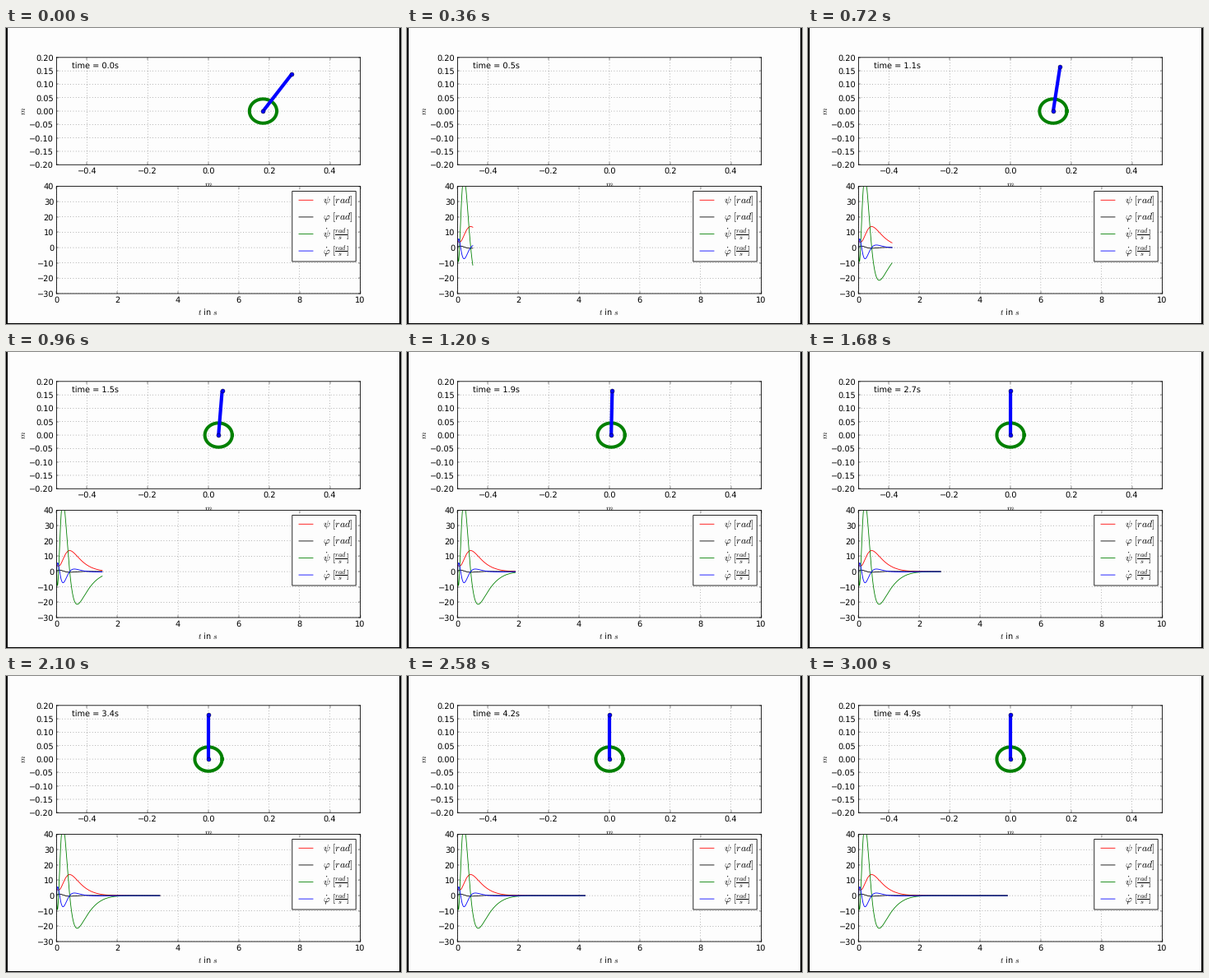
Animation of 480 by 360 pixels, one loop 3060 ms. Source, as a matplotlib script:

```python
import numpy as np
import matplotlib.pyplot as plt
from matplotlib.animation import FuncAnimation
from matplotlib.patches import Rectangle

W, H = 480, 360
FRAMES, INTERVAL = 51, 60
STEPS = 10  # curve samples per displayed time step
RADIUS, LENGTH = 0.045, 0.166
PAPER = "#fdfdfd"

plt.rcParams.update({
    "font.family": "DejaVu Sans",
    "font.size": 11.7,
    "mathtext.fontset": "cm",
    "text.hinting": "none",
    "path.snap": False,
    "axes.linewidth": 1,
    "axes.facecolor": PAPER,
    "figure.facecolor": PAPER,
})


def damped_response(t, values, slopes, rate=8):
    """exp(-rate*t) * polynomial through a few values and slopes, with its derivative."""
    n = np.arange(len(values) + len(slopes))

    def basis(t):
        t = np.array(t, float, ndmin=1)[:, None]
        decay = np.exp(-rate * t)
        rise = n * t ** np.maximum(n - 1, 0)
        return t ** n * decay, (rise - rate * t ** n) * decay

    A = np.vstack([basis(list(values))[0], basis(list(slopes))[1]])
    c = np.linalg.solve(A, [*values.values(), *slopes.values()])
    return [b @ c for b in basis(t)]


time = np.arange((FRAMES - 1) * STEPS + 1) / (10 * STEPS)

# ball angle psi and pendulum angle phi, settling to zero
psi, dpsi = damped_response(time, {0: 4, 0.432: 13.7, 1.1: 3.13, 1.9: 0.13},
                            {0: 0, 0.15: 37.5, 0.432: 0, 0.75: -20.5})
phi, dphi = damped_response(time, {0: 0.6, 0.43: -0.43, 1.1: 0.135, 1.9: 0.02},
                            {0: 0, 0.14: -4.25, 0.43: 0, 0.65: 1.55})
series = [
    (psi, "r", r"$\psi$ $[rad]$"),
    (phi, "k", r"$\varphi$ $[rad]$"),
    (dpsi, "g", r"$\dot{\psi}$ $[\frac{rad}{s}]$"),
    (dphi, "b", r"$\dot{\varphi}$ $[\frac{rad}{s}]$"),
]

fig = plt.figure(figsize=(8, 6), dpi=60)


def px(x, y):
    return x / W, 1 - y / H


def box(x0, y0, x1, y1, **kw):
    return Rectangle(px(x0, y1), (x1 - x0) / W, (y1 - y0) / H,
                     transform=fig.transFigure, **kw)


def make_axes(top, xlim, ylim, xstep, ystep, xfmt, yfmt):
    x0, width, height = 61.5, 369, 130.5
    ax = fig.add_axes([*px(x0, top + height), width / W, height / H])

    def ticks(lim, step, fmt):
        k = np.arange(np.ceil(lim[0] / step), np.floor(lim[1] / step) + 1)
        at = np.round(k * step, 2) + 0.0
        return at, [format(v, fmt).replace("-", "\u2212") for v in at]

    ax.set_xticks(*ticks(xlim, xstep, xfmt))
    ax.set_yticks(*ticks(ylim, ystep, yfmt))
    ax.set(xlim=xlim, ylim=ylim)
    ax.tick_params(direction="in", top=True, right=True,
                   length=4, width=0.5, pad=4)
    ax.grid(color="#333333", lw=0.5, ls=(0, (2, 6)))
    return ax


def label(ax, x, y, s, **kw):
    return ax.text(*px(x, y), s, transform=fig.transFigure, **kw)


scene = make_axes(35.8, (-0.5, 0.5), (-0.2, 0.2), 0.2, 0.05, ".1f", ".2f")
label(scene, 246, 193, "$m$", ha="center", va="baseline")
label(scene, 21, 101, "$m$", ha="center", va="center", rotation=90)
clock = scene.text(0.05, 0.9, "", transform=scene.transAxes)

plot = make_axes(192.5, (0, 10), (-30, 40), 2, 10, ".0f", ".0f")
label(plot, 245.7, 349, "$t$ in $s$", ha="center", va="baseline")

ball, = scene.plot([], [], "g", lw=4.8)
rod, = scene.plot([], [], "b", lw=5, marker="o", ms=6, mec="k", mew=0.5,
                  solid_capstyle="butt")
curves = [plot.plot([], [], color, lw=1)[0] for _, color, _ in series]

# legend
plot.add_patch(box(347.8, 198.5, 425.2, 284, fc=PAPER, ec="k", lw=1,
                   zorder=5, clip_on=False))
for row, (_, color, name) in enumerate(series):
    y = 209.3 + 20.6 * row
    plot.plot([356 / W, 373 / W], [1 - y / H] * 2, color, lw=1,
              transform=fig.transFigure, zorder=6)
    label(plot, 385, y + 3.6, name, size=14.2, va="baseline", zorder=6)
plot.set(xlim=(0, 10), ylim=(-30, 40))

# dark frame edges
for edge in ((0, 0, 2, H), (W - 2, 0, W, H), (0, H - 1, W, H)):
    fig.add_artist(box(*edge, fc="k", lw=0))

turn = np.linspace(0, 2 * np.pi, 90)


def update(frame):
    i = max(frame - 1, 0) * STEPS
    x = RADIUS * psi[i]
    ball.set_data(x + RADIUS * np.cos(turn), RADIUS * np.sin(turn))
    rod.set_data([x, x + LENGTH * np.sin(phi[i])],
                 [0, LENGTH * np.cos(phi[i])])
    for curve, (data, _, _) in zip(curves, series):
        curve.set_data(time[:i + 1], data[:i + 1])
    clock.set_text(f"time = {time[i]:.1f}s")
    return [ball, rod, clock, *curves]


anim = FuncAnimation(fig, update, frames=FRAMES, interval=INTERVAL,
                     repeat=True, repeat_delay=0, blit=False)
plt.show()
```
